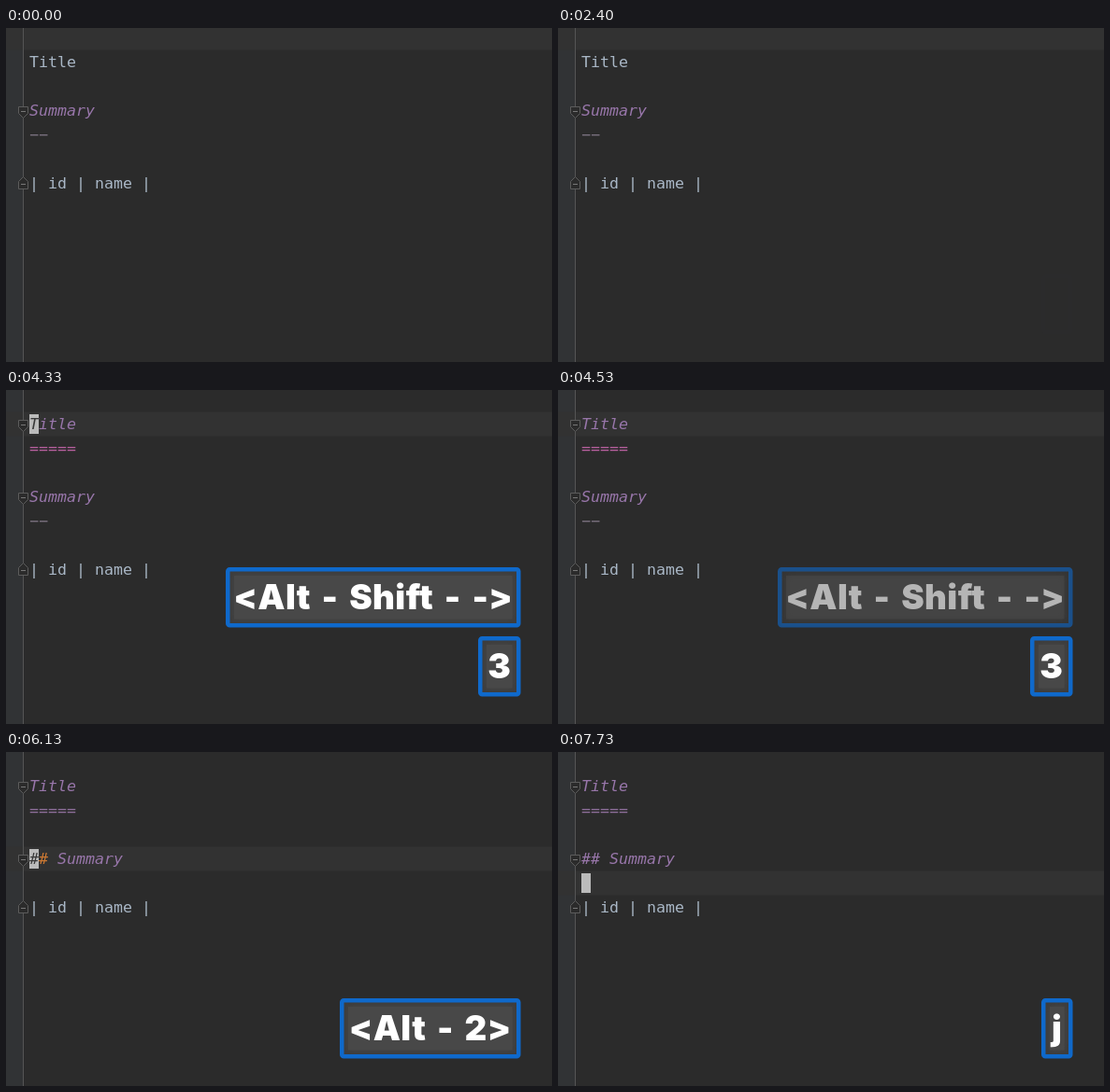
An HTML page with a canvas that plays this animation: 584x358 px, repeating every 8 s.

```html
<!DOCTYPE html>
<html lang="en">
<head>
<meta charset="utf-8">
<style>
html, body { margin: 0; width: 100%; height: 100%; overflow: hidden; background: #2b2b2b; }
canvas { display: block; }
</style>
</head>
<body>
<canvas id="stage" width="584" height="358"></canvas>
<script>
const ctx = document.getElementById('stage').getContext('2d');
const LOOP = 8000, LINE = 26, LEFT = 25;
const MONO = '16.6px "DejaVu Sans Mono", monospace';
const PLAIN = '#a9b7c6', PURPLE = '#9876aa', PINK = '#b8609f', DIM = '#7b7180', ORANGE = '#cc7832';

// Moments at which the document or the caret changes
const UNDERLINE = 3350, HASHES = 5900, SETTLE = 6230;
const BLINKS = [430, 960, 1430, 1900, 2450, 4430, 4630, 5310, 5840, 6470, 7000];
const MOVES = [[0, 0], [2450, 1], [4630, 4], [7450, 5]];

// Key badges: shown at, pushed up at, fade start (the joiner keeps "->" from becoming an arrow)
const KEYS = [
  { label: () => 'j', width: () => 33, at: 2400, push: 3070 },
  { label: () => '<Alt - Shift - -\u200c>', width: () => 315, at: 3070, push: 3930 },
  { label: t => t < 4630 ? '3' : '3j', width: t => t < 4630 ? 45 : 58, at: 3930, push: 5270 },
  { label: () => '<Alt - 2>', width: () => 193, at: 5270, push: 7400, fade: 7270 },
  { label: () => 'j', width: () => 33, at: 7400, push: Infinity }
];

const ramp = (t, from, length) => Math.min(1, Math.max(0, (t - from) / length));
const easeOut = p => 1 - (1 - p) ** 3;

function rect(x, y, w, h, color) {
  ctx.fillStyle = color;
  ctx.fillRect(x, y, w, h);
}

function write(line, text, color, italic = false, column = 0) {
  ctx.font = (italic ? 'italic ' : '') + MONO;
  ctx.fillStyle = color;
  ctx.fillText(text, LEFT + column * 10, line * LINE + 16);
}

function foldMark(line, down) {
  const y = line * LINE;
  const [flat, shoulder, tip] = down ? [6.5, 13.5, 18.5] : [16.5, 8.5, 3.5];
  ctx.beginPath();
  ctx.moveTo(13.5, y + flat);
  ctx.lineTo(23.5, y + flat);
  ctx.lineTo(23.5, y + shoulder);
  ctx.lineTo(18.5, y + tip);
  ctx.lineTo(13.5, y + shoulder);
  ctx.closePath();
  ctx.fillStyle = '#2b2b2b';
  ctx.fill();
  ctx.strokeStyle = '#5c5c5c';
  ctx.lineWidth = 1;
  ctx.stroke();
  rect(16, y + 11, 5, 1, '#777');
}

function drawDocument(t) {
  const titled = t >= UNDERLINE, hashed = t >= HASHES;
  const summary = titled ? 4 : 3;
  const table = titled && !hashed ? 7 : 6;

  write(1, 'Title', titled ? PURPLE : PLAIN, titled);
  if (titled) {
    write(2, '=====', t < 4630 ? PINK : '#8e6f9b');
    foldMark(1, true);
  }
  if (hashed) {
    const settled = t >= SETTLE;
    write(summary, '##', settled ? PURPLE : ORANGE, settled);
    write(summary, 'Summary', PURPLE, true, 3);
  } else {
    write(summary, 'Summary', PURPLE, true);
    write(summary + 1, '\u2212\u2212', DIM);
  }
  write(table, '| id | name |', PLAIN);
  foldMark(summary, true);
  foldMark(table, false);
}

function drawCaret(t, line) {
  const on = BLINKS.filter(b => b <= t).length % 2;
  if (!on) return;
  rect(LEFT, line * LINE, 10, 21, '#bbb');
  if (line === 1) write(1, 'T', '#383838', t >= UNDERLINE);
  if (line === 4) write(4, t < HASHES ? 'S' : '#', '#383838', true);
}

function drawKey(key, t) {
  const fade = key.fade || key.push + 470;
  const alpha = ramp(t, key.at, 200) * (1 - ramp(t, fade, 330));
  if (alpha <= 0) return;
  const w = key.width(t) + 0.5, h = 64.5, x = 550.5 - w;
  const y = 264 - 74 * easeOut(ramp(t, key.push, 200));

  ctx.save();
  ctx.globalAlpha = alpha;
  rect(x + 4, y + 4, w - 8, h - 8, '#3d3d3d');
  ctx.shadowColor = '#484848';
  ctx.shadowBlur = 6;
  rect(x + 9, y + 9, w - 18, h - 18, '#484848');
  ctx.shadowColor = 'transparent';
  ctx.beginPath();
  ctx.roundRect(x + 2.25, y + 2.25, w - 4.5, h - 4.5, 2);
  ctx.strokeStyle = '#0f69cb';
  ctx.lineWidth = 4.5;
  ctx.stroke();
  ctx.font = '900 36.8px Inter, sans-serif';
  ctx.letterSpacing = '0.4px';
  ctx.wordSpacing = '4px';
  ctx.textAlign = 'center';
  ctx.fillStyle = '#fff';
  ctx.fillText(key.label(t), x + w / 2, y + 44.5);
  ctx.restore();
}

function draw(t) {
  const line = MOVES.filter(m => m[0] <= t).pop()[1];
  rect(0, 0, 584, 358, '#2b2b2b');
  rect(0, 0, 18, 358, '#313335');
  rect(0, line * LINE - 2.5, 584, LINE, '#323232');
  rect(18, 0, 1, 358, '#555');
  drawDocument(t);
  drawCaret(t, line);
  KEYS.forEach(key => drawKey(key, t));
}

const start = performance.now();
function tick() {
  draw((performance.now() - start) % LOOP);
  requestAnimationFrame(tick);
}
tick();
</script>
</body>
</html>
```
